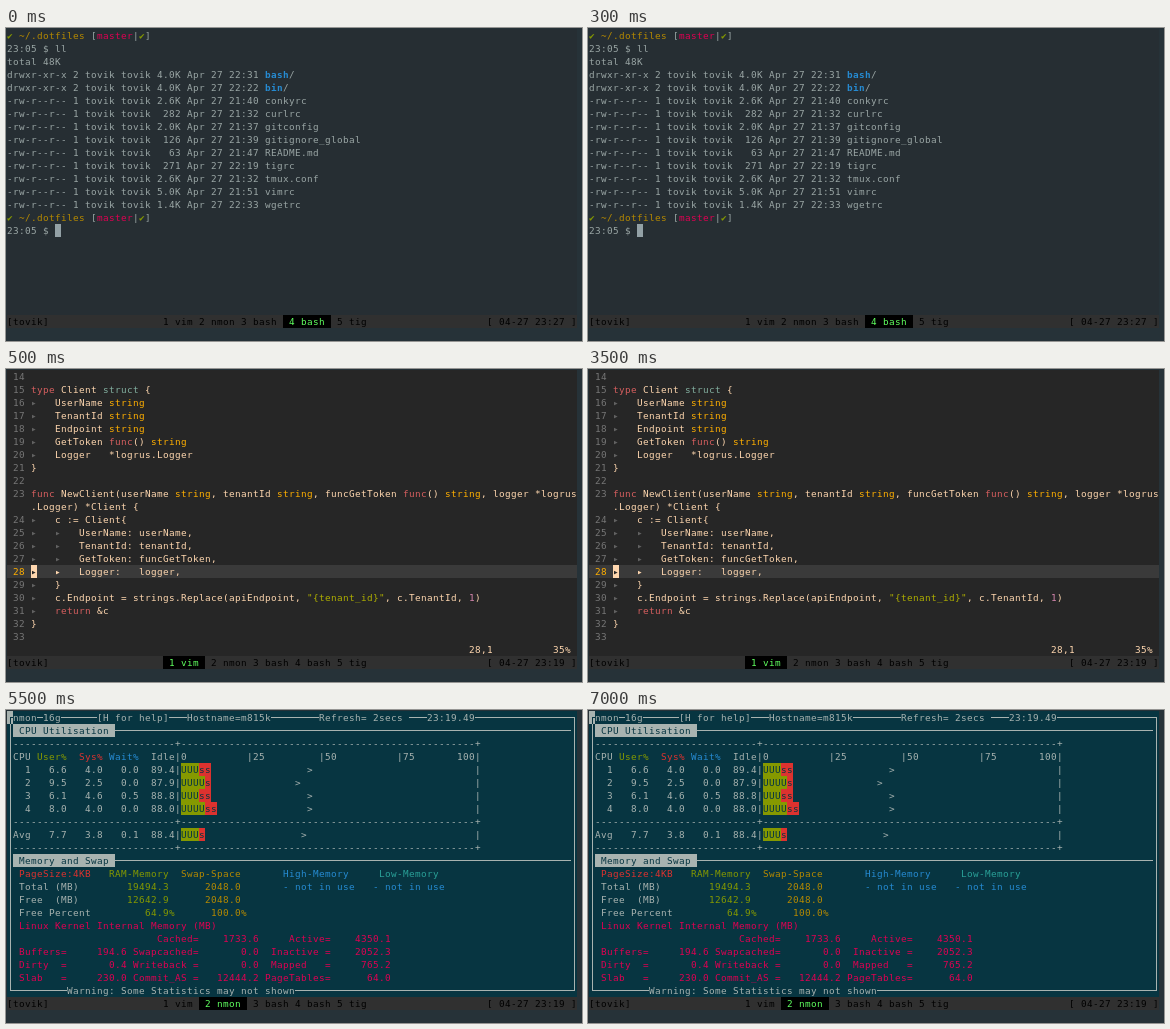
An HTML page that plays this animation: 576x313 px, repeating every 8000 ms.

```html
<!DOCTYPE html>
<html lang="en">
<head>
<meta charset="utf-8">
<title>Terminal session</title>
<style>
  html, body { margin: 0; width: 100%; height: 100%; overflow: hidden; background: #263238; }
  .screen {
    position: absolute; left: 1px; top: 1px; width: 570px; height: 299px;
    overflow: hidden; visibility: hidden;
    font: 9.33px/13px "DejaVu Sans Mono", monospace;
    animation: 8s step-end infinite;
  }
  /* Each glyph sits in a 6px terminal cell. */
  .screen span { position: absolute; height: 13px; white-space: pre; letter-spacing: calc(6px - 1ch); }
  .screen i { position: absolute; box-sizing: border-box; }
  #shell { background: #262e33; color: #9aa6a5; animation-name: shell; }
  #editor { background: #262626; color: #ffd7af; animation-name: editor; }
  #monitor { background: #073541; color: #a8b3b0; animation-name: monitor; }
  @keyframes shell { 0% { visibility: visible } 6.25%, 100% { visibility: hidden } }
  @keyframes editor { 0% { visibility: hidden } 6.25% { visibility: visible } 68.75%, 100% { visibility: hidden } }
  @keyframes monitor { 0% { visibility: hidden } 68.75%, 100% { visibility: visible } }
</style>
</head>
<body>
<div class="screen" id="shell"></div>
<div class="screen" id="editor"></div>
<div class="screen" id="monitor"></div>
<script>
const CELL = 6, ROW = 13, USER = 'tovik';
const green = '#859900', yellow = '#b58900', red = '#dc322f',
      blue = '#268bd2', cyan = '#2aa198', crimson = '#df0052';

function box(screen, x, y, w, h, style) {
  const el = document.createElement('i');
  el.style.cssText = `left:${x}px;top:${y}px;width:${w}px;height:${h}px;${style}`;
  screen.append(el);
}

// Parts: a number moves to a column, a string or [text, color, background, weight] is printed.
function line(screen, row, ...parts) {
  let col = 0;
  for (const part of parts) {
    if (typeof part === 'number') { col = part; continue; }
    const [text, color = '', background = '', weight = ''] = [].concat(part);
    const el = document.createElement('span');
    el.textContent = text;
    Object.assign(el.style, {
      left: col * CELL + 'px', top: row * ROW + 'px', color, background, fontWeight: weight
    });
    screen.append(el);
    col += text.length;
  }
}

function statusBar(screen, active, clock) {
  box(screen, 0, 22 * ROW, 570, ROW, 'background:#303030');
  const tabs = ['1 vim', '2 nmon', '3 bash', '4 bash', '5 tig'].flatMap((tab, i) =>
    i === active ? [[` ${tab} `, '#5fff5f', '#000'], ' '] : [[tab + ' ', '#000']]);
  line(screen, 22, [`[${USER}]`, '#000'], 26, ...tabs, 80, [`[ 04-27 ${clock} ]`, '#000']);
}

function drawShell(s) {
  const prompt = row => {
    line(s, row, ['✔', green], 2, ['~/.dotfiles', yellow], ' [', ['master', crimson], '|', ['✔', green], ']');
    line(s, row + 1, '23:05 $');
  };
  const files = [
    ['4.0K', '22:31', 'bash'], ['4.0K', '22:22', 'bin'], ['2.6K', '21:40', 'conkyrc'],
    ['282', '21:32', 'curlrc'], ['2.0K', '21:37', 'gitconfig'], ['126', '21:39', 'gitignore_global'],
    ['63', '21:47', 'README.md'], ['271', '22:19', 'tigrc'], ['2.6K', '21:32', 'tmux.conf'],
    ['5.0K', '21:51', 'vimrc'], ['1.4K', '22:33', 'wgetrc']
  ];
  prompt(0);
  line(s, 1, 8, 'll');
  line(s, 2, 'total 48K');
  files.forEach(([size, time, name], i) => {
    const dir = i < 2;
    const mode = dir ? 'drwxr-xr-x 2' : '-rw-r--r-- 1';
    line(s, 3 + i, `${mode} ${USER} ${USER} ${size.padStart(4)} Apr 27 ${time} `,
      ...(dir ? [[name, blue, '', 'bold'], '/'] : [name]));
  });
  prompt(14);
  box(s, 8 * CELL, 15 * ROW, CELL, ROW, 'background:#93a1a6');
  statusBar(s, 3, '23:27');
}

function drawEditor(s) {
  const colors = {
    type: '#d75f5f', func: '#d75f5f', return: '#d75f5f', struct: '#83b0a0',
    string: '#ffaf00', '1': '#d787af', '▸': '#626262'
  };
  const highlight = code => code
    .split(/("[^"]*"|▸|\b(?:type|func|return|struct|string|1)\b)/)
    .filter(Boolean)
    .map(t => [t, t[0] === '"' ? '#afaf00' : colors[t]]);
  const code = [
    '',
    'type Client struct {',
    '▸   UserName string',
    '▸   TenantId string',
    '▸   Endpoint string',
    '▸   GetToken func() string',
    '▸   Logger   *logrus.Logger',
    '}',
    '',
    'func NewClient(userName string, tenantId string, funcGetToken func() string, logger *logrus\n.Logger) *Client {',
    '▸   c := Client{',
    '▸   ▸   UserName: userName,',
    '▸   ▸   TenantId: tenantId,',
    '▸   ▸   GetToken: funcGetToken,',
    '▸   ▸   Logger:   logger,',
    '▸   }',
    '▸   c.Endpoint = strings.Replace(apiEndpoint, "{tenant_id}", c.TenantId, 1)',
    '▸   return &c',
    '}',
    ''
  ];
  let row = 0;
  code.forEach((text, i) => {
    const number = 14 + i, current = number === 28;
    if (current) box(s, 0, row * ROW, 570, ROW, 'background:#3a3a3a');
    line(s, row, 1, [String(number), current ? '#ffaf00' : '#767676']);
    for (const part of text.split('\n')) {
      if (current) line(s, row, 4, ['▸', '#262626', '#ffd7af'], part.slice(1));
      else line(s, row, 4, ...highlight(part));
      row++;
    }
  });
  line(s, 21, 77, '28,1', 91, '35%');
  statusBar(s, 0, '23:19');
}

function drawMonitor(s) {
  const bg = '#073541', fg = '#a8b3b0';
  const title = text => [text, '', bg];
  const banner = (row, text) => {
    box(s, CELL, row * ROW + 6, 93 * CELL, 1, `background:${fg}`);
    line(s, row, 1, [` ${text} `, bg, fg]);
  };
  const rule = row => line(s, row, 1, '-'.repeat(27) + '+' + '-'.repeat(49) + '+');
  const cpu = (row, label, values, user, sys, peak) => line(s, row,
    1, label, 5, values.map(v => v.padStart(5)).join(' '), 28, '|',
    ['U'.repeat(user), bg, green], ['s'.repeat(sys), bg, red], peak, '>', 78, '|');

  box(s, 3, 6, 565, 274, `border:1px solid ${fg}`);
  box(s, 0, 0, CELL, ROW, `background:${fg}`);
  box(s, 3, 6, 3, 7, `border:solid ${bg};border-width:1px 0 0 1px`);
  line(s, 0, 1, title('nmon'), 6, title('16g'), 15, title('[H for help]'),
    30, title('Hostname=m815k'), 52, title('Refresh= 2secs '), 70, title('23:19.49'));

  banner(1, 'CPU Utilisation');
  [2, 8, 10].forEach(rule);
  line(s, 3, 1, 'CPU', 5, ['User%', green], 12, ['Sys%', red], 17, ['Wait%', blue], 24, 'Idle|0',
    40, '|25', 52, '|50', 65, '|75', 75, '100|');
  cpu(4, '  1', ['6.6', '4.0', '0.0', '89.4'], 3, 2, 50);
  cpu(5, '  2', ['9.5', '2.5', '0.0', '87.9'], 4, 1, 48);
  cpu(6, '  3', ['6.1', '4.6', '0.5', '88.8'], 3, 2, 50);
  cpu(7, '  4', ['8.0', '4.0', '0.0', '88.0'], 4, 2, 50);
  cpu(9, 'Avg', ['7.7', '3.8', '0.1', '88.4'], 3, 1, 49);

  banner(11, 'Memory and Swap');
  line(s, 12, 2, ['PageSize:4KB', red], 17, ['RAM-Memory', green], 29, ['Swap-Space', yellow],
    46, ['High-Memory', blue], 62, ['Low-Memory', cyan]);
  line(s, 13, 2, 'Total (MB)', 20, ['19494.3', green], 33, ['2048.0', yellow],
    46, ['- not in use', blue], 61, ['- not in use', blue]);
  line(s, 14, 2, 'Free  (MB)', 20, ['12642.9', green], 33, ['2048.0', yellow]);
  line(s, 15, 2, 'Free Percent', 23, ['64.9%', green], 34, ['100.0%', yellow]);

  const kernel = [
    ['', '', '    Cached=', '1733.6', '   Active=', '4350.1'],
    ['Buffers=', '194.6', 'Swapcached=', '0.0', 'Inactive =', '2052.3'],
    ['Dirty  =', '0.4', 'Writeback =', '0.0', 'Mapped   =', '765.2'],
    ['Slab   =', '230.0', 'Commit_AS =', '12444.2', 'PageTables=', '64.0']
  ];
  line(s, 16, 2, ['Linux Kernel Internal Memory (MB)', crimson]);
  kernel.forEach(([a, av, b, bv, c, cv], i) => line(s, 17 + i, 2, [
    a.padEnd(8) + av.padStart(10) + ' ' + b + bv.padStart(10) + c.padStart(12) + cv.padStart(10), crimson]));
  line(s, 21, 10, title('Warning: Some Statistics may not shown'));
  statusBar(s, 1, '23:19');
}

const screen = id => document.getElementById(id);
drawShell(screen('shell'));
drawEditor(screen('editor'));
drawMonitor(screen('monitor'));
</script>
</body>
</html>
```
